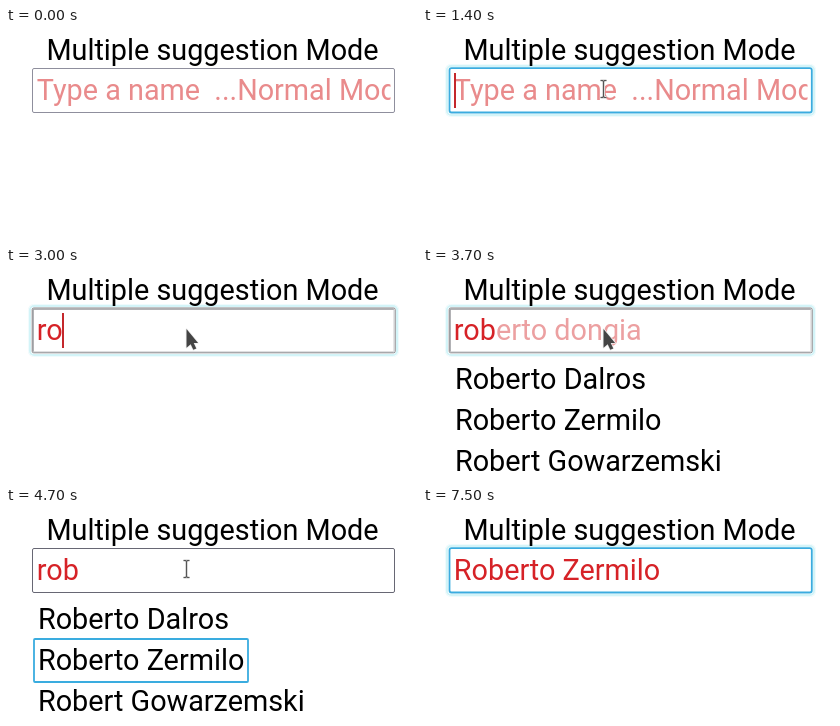
Write an HTML page that moves like this. It is 411 px wide and 212 px high and loops after 8000 ms.

```html
<!DOCTYPE html>
<html lang="en">
<head>
<meta charset="utf-8">
<title>Multiple suggestion Mode</title>
<style>
  html, body { margin: 0; width: 100%; height: 100%; overflow: hidden; background: #fff; }
  svg { display: block; width: 411px; height: 212px; }
  text { font: 28.8px Roboto, Arial, sans-serif; white-space: pre; }
  #typed { fill: #d62227; }
  #hint { fill: #eca0a1; }
  #placeholder { fill: #e98b8c; }
  .box, .ring { fill: none; }
  .ring { stroke: #3aacdf; stroke-width: 1.8; }
  .halo { stroke: #e2e2e2; stroke-width: 3; }
</style>
</head>
<body>
<svg viewBox="0 0 411 212">
  <defs>
    <clipPath id="inner"><rect x="30" y="42" width="354.5" height="42"/></clipPath>
    <path id="beamShape" d="M-3 -8.5H-1L0 -7.5L1 -8.5H3M0 -7.5V7.5M-3 8.5H-1L0 7.5L1 8.5H3"/>
  </defs>

  <g id="plain"><rect id="edge" class="box" x="26.5" y="40.5" width="362" height="44" rx="1.5"/></g>
  <g id="glow" fill="none">
    <rect x="22.5" y="36.5" width="370" height="52" rx="5" stroke="#f0fbfd"/>
    <rect x="24" y="38" width="367" height="49" rx="4" stroke="#d3f4f8" stroke-width="2"/>
  </g>
  <rect id="focus" class="ring" x="26.5" y="40.1" width="362.3" height="44.4" rx="2"/>
  <g id="inset" fill="none">
    <rect x="27.2" y="41.2" width="360.6" height="42.4" stroke="#dcdcde"/>
    <path d="M27.2 83.6V41.2H387.8" stroke="#9c9c9f"/>
    <rect x="26.2" y="40" width="363" height="44.8" rx="1.5" stroke="#858589"/>
  </g>

  <text x="40.4" y="32">Multiple suggestion Mode</text>

  <g clip-path="url(#inner)">
    <text id="placeholder" x="30.8" y="72">Type a name  ...Normal Mode</text>
    <text x="30.8" y="72"><tspan id="typed"></tspan><tspan id="hint"></tspan></text>
  </g>
  <rect id="caret" y="45" width="2" height="35" fill="#c4282c"/>

  <g id="list">
    <text x="31.9" y="121">Roberto Dalros</text>
    <text x="31.9" y="162">Roberto Zermilo</text>
    <text x="31.9" y="203">Robert Gowarzemski</text>
    <rect id="pick" class="ring" x="28" height="43" rx="1"/>
  </g>

  <g id="arrow">
    <path d="M0 0V18.8L4.2 15.2L6.8 20.8L9.8 19.4L7.2 14H11.6Z"
          fill="#444" stroke="#eee" stroke-width="1.6" paint-order="stroke" stroke-linejoin="round"/>
  </g>
  <g id="beam" fill="none">
    <use href="#beamShape" class="halo"/>
    <use href="#beamShape" stroke="#555" stroke-width="1.1"/>
  </g>
</svg>

<script>
const LOOP = 8000;
const $ = id => document.getElementById(id);
const show = (id, on) => $(id).setAttribute("visibility", on ? "visible" : "hidden");

// Each step overrides only what changes from the step before it.
const steps = [
  [0,    { look: "plain", text: "", hint: "", caret: 0, list: false, row: -1, mouse: "" }],
  [500,  { mouse: "move" }],
  [1200, { look: "focus", caret: 31, mouse: "beam" }],
  [2600, { caret: 0 }],
  [2800, { look: "inset", text: "r", caret: 40, mouse: "arrow" }],
  [3000, { text: "ro", caret: 56 }],
  [3300, { text: "rob", hint: "erto dongia", caret: 72, list: true }],
  [3700, { caret: 0 }],
  [4200, { look: "plain", hint: "", row: 0, mouse: "beam" }],
  [4700, { row: 1 }],
  [6100, { look: "focus", text: "Roberto Zermilo", caret: 237, list: false, row: -1 }],
  [7300, { caret: 0 }],
  [7500, { mouse: "" }]
];
const rowWidths = [199, 214];

function stateAt(t) {
  const s = {};
  for (const [at, change] of steps) if (t >= at) Object.assign(s, change);
  return s;
}

// The pointer rises from below in 100 ms steps, easing to rest inside the field.
function pointerAt(t) {
  const p = Math.min(1, Math.floor((t - 500) / 100) / 7);
  const left = (1 - p) ** 1.6;
  return [180.5 + 18 * left, 61 + 66 * left];
}

function drawPointer(mouse, t) {
  const [x, y] = mouse === "move" ? pointerAt(t) : [180.5, 61];
  const kind = mouse === "move" ? (y > 86 ? "arrow" : "beam") : mouse;
  for (const id of ["arrow", "beam"]) {
    show(id, kind === id);
    $(id).setAttribute("transform", `translate(${x} ${y})`);
  }
  return kind;
}

function draw(t) {
  const s = stateAt(t);
  const kind = drawPointer(s.mouse, t);

  for (const id of ["plain", "focus", "inset"]) show(id, s.look === id);
  show("glow", s.look !== "plain");
  $("edge").setAttribute("stroke", kind === "beam" ? "#676774" : "#8f8f9d");

  show("placeholder", !s.text);
  $("typed").textContent = s.text;
  $("hint").textContent = s.hint;
  show("caret", s.caret);
  $("caret").setAttribute("x", s.caret);

  show("list", s.list);
  show("pick", s.list && s.row >= 0);
  if (s.row >= 0) {
    $("pick").setAttribute("y", 90 + 41 * s.row);
    $("pick").setAttribute("width", rowWidths[s.row]);
  }
}

const start = performance.now();
function tick() {
  draw((performance.now() - start) % LOOP);
  requestAnimationFrame(tick);
}
tick();
</script>
</body>
</html>
```
